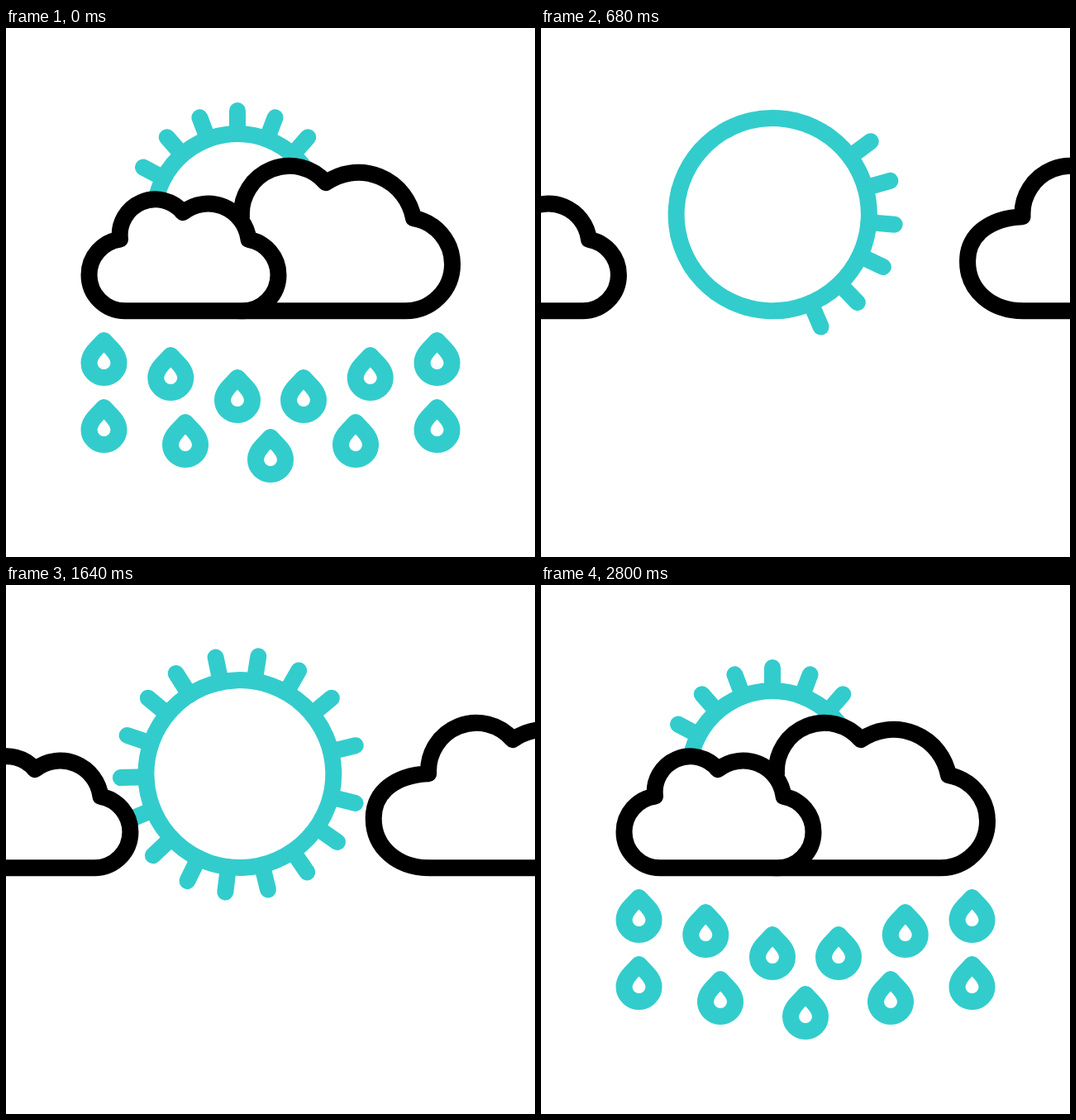
Animation of 640x640 px, one loop 3 s. Source, as an HTML page:

```html
<!DOCTYPE html>
<html lang="en">
<head>
<meta charset="utf-8">
<title>Rain cloud</title>
<style>
  html, body { margin: 0; width: 100%; height: 100%; overflow: hidden; background: #fff; }
  svg { display: block; width: 100%; height: 100%; }
  #sun, #drops { fill: none; stroke: #33cccc; }
  #left, #right { fill: #fff; stroke: #000; }
</style>
</head>
<body>
<svg viewBox="0 0 640 640" stroke-width="20" stroke-linecap="round" stroke-linejoin="round">
  <g id="sun"><circle id="disc" cx="280" cy="229" r="101"/></g>
  <g id="drops"></g>
  <path id="right" d="M285 228 A58 58 0 0 1 387 187 A68 68 0 0 1 493 230
    A56.5 56.5 0 0 1 540 285.5 A56.5 56.5 0 0 1 483.5 342 H286
    C248 342 218.5 318 218.5 282 C218.5 250 245 230 285 228 Z"/>
  <path id="left" d="M144 342 A43.5 43.5 0 0 1 100.5 298.5 A43.5 43.5 0 0 1 138 255.5
    A43 43 0 0 1 214 223 A49.3 49.3 0 0 1 293.5 255.7
    A43.5 43.5 0 0 1 329.5 298.5 A43.5 43.5 0 0 1 286 342 Z"/>
</svg>
<script>
const LOOP = 3000, STEP = 40;
const $ = id => document.getElementById(id);
const span = (t, a, b) => Math.max(0, Math.min(1, (t - a) / (b - a)));
const lerp = (a, b, k) => a + (b - a) * k;

function add(parent, tag, attrs) {
  const el = document.createElementNS(parent.namespaceURI, tag);
  for (const k in attrs) el.setAttribute(k, attrs[k]);
  parent.appendChild(el);
  return el;
}

// cubic-bezier(a, 0, 1 - b, 1)
function ease(x, a, b = a) {
  let lo = 0, hi = 1;
  for (let i = 0; i < 24; i++) {
    const s = (lo + hi) / 2, r = 1 - s;
    if (3 * r * r * s * a + 3 * r * s * s * (1 - b) + s * s * s < x) lo = s;
    else hi = s;
  }
  return lo * lo * (3 - 2 * lo);
}
const opening = t => ease(span(t, 327, 967), 0.65);
const closing = t => ease(span(t, 1320, 2000), 0.65, 0.72);

// Fans of evenly spread rays; only the first fan is always out
const rays = [];
function fan(centre, first, last, fixed) {
  for (let k = first; k <= last; k++) {
    const angle = centre + 20.7 * k;
    const el = add($('sun'), 'line', { x1: 0, x2: 0, transform: `translate(280 229) rotate(${angle})` });
    rays.push({ el, fixed, start: 740 + 2.4 * (Math.abs(angle) - 60) });
  }
}
fan(0, -3, 2, true);
fan(121.5, -3, 1);
fan(-122.6, -2, 2);
fan(168, 0, 0);

// Two rows of drops, mirrored about the middle
const drops = [];
function addDrop(x, y, start) {
  for (const px of new Set([x, 640 - x])) {
    const el = add($('drops'), 'path', {
      d: 'M0-27C8-18 18-11 18 0A18 18 0 0 1-18 0C-18-11-8-18 0-27Z'
    });
    drops.push({ x: px, y, start, el });
  }
}
for (let i = 0; i < 3; i++) {
  addDrop(118.5 + 80.75 * i, 405 + 13.5 * i + 4.5 * i * i, 90 + 41 * i);
  addDrop(118.5 + 96.25 * i + 2.25 * i * i, 486 + 18 * i, 40 * i);
}

function drawSun(t) {
  const up = opening(t), down = closing(t), p = up - down;
  const r = 101 + 24.4 * p, tip = 129 + 29.5 * p;
  $('sun').setAttribute('transform', `rotate(${180 * (up + down)} 281.2 227.4)`);
  $('disc').setAttribute('r', r);
  for (const { el, fixed, start } of rays) {
    const grow = fixed ? 1
      : ease(span(t, start, start + 160), 0.4) - ease(span(t, 1660, 1860), 0.4);
    el.setAttribute('y1', -r);
    el.setAttribute('y2', -lerp(r, tip, grow));
  }
}

function drawClouds(t) {
  const p = opening(t + 3) - closing(t + 3);
  $('left').setAttribute('transform', `translate(${-361 * p} 0.2)`);
  $('right').setAttribute('transform', `translate(${456 * p} 0.2)`);
}

// Drops speed up as they leave, then slide out from behind the clouds
function drawDrops(t) {
  $('drops').style.display = t < 800 || t > 2240 ? '' : 'none';
  for (const { x, y, start, el } of drops) {
    const fall = 0.00256 * Math.max(0, t - start) ** 2;
    const arrive = ease(span(t, 2240 + start, 2625 + start), 0.4);
    const py = t < 1500 ? y + fall : lerp(300, y, arrive);
    el.setAttribute('transform', `translate(${x} ${py})`);
  }
}

function draw(t) {
  drawSun(t);
  drawClouds(t);
  drawDrops(t);
}

const t0 = performance.now();
function tick() {
  const t = (performance.now() - t0) % LOOP;
  draw(Math.floor(t / STEP) * STEP);
  requestAnimationFrame(tick);
}
tick();
</script>
</body>
</html>
```
